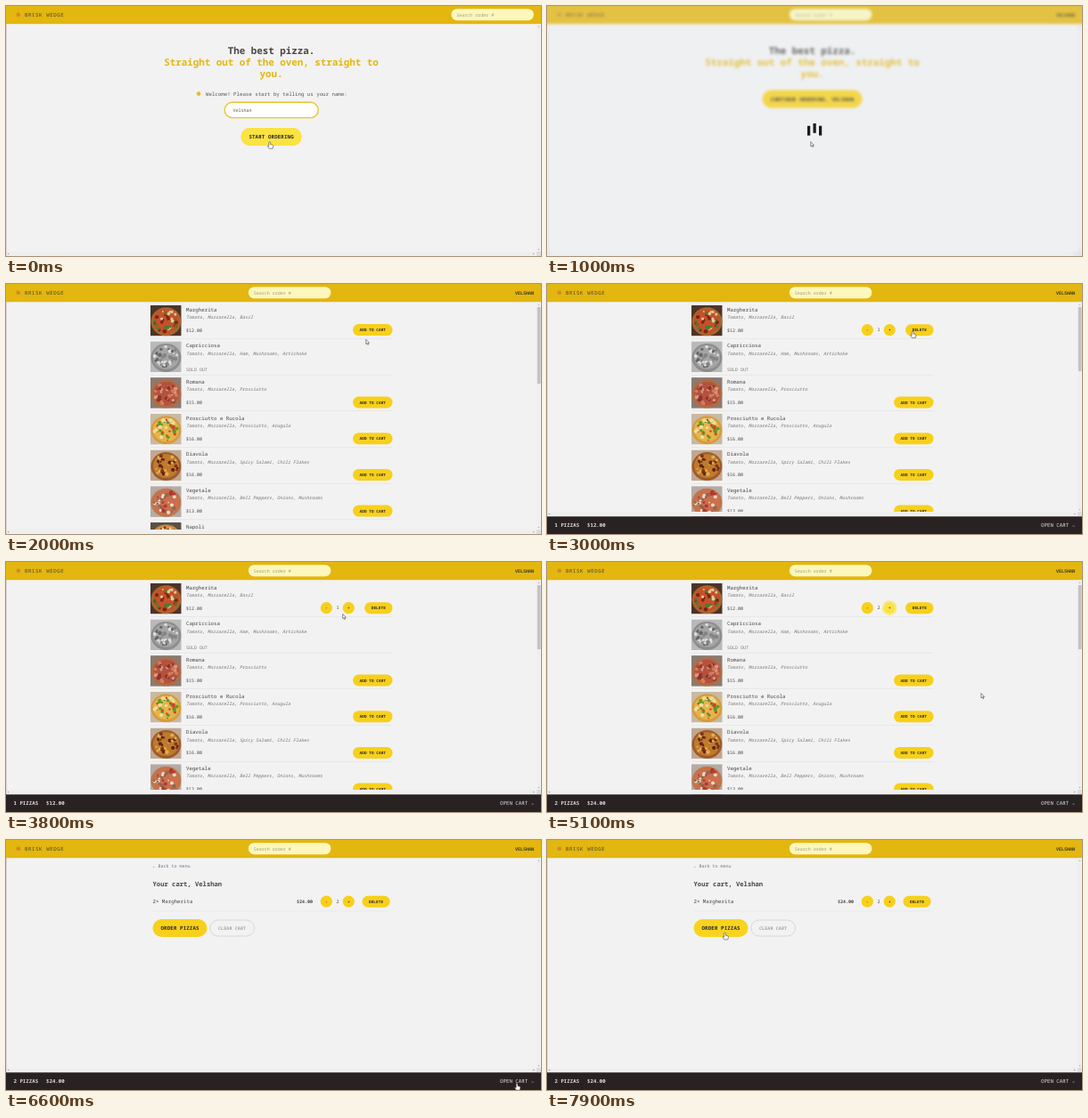
Animation of 600 by 281 pixels, one loop 8000 ms. Source, as an HTML page:

```html
<!DOCTYPE html>
<html lang="en">
<head>
<meta charset="utf-8">
<title>Pizza ordering</title>
<style>
html, body { margin: 0; width: 100%; height: 100%; overflow: hidden; background: #f2f2f2; }
svg { display: block; width: 600px; height: 281px; }
text {
  font-family: "Noto Sans Mono", "DejaVu Sans Mono", monospace;
  text-rendering: geometricPrecision;
  white-space: pre;
}
</style>
</head>
<body>
<svg id="stage" viewBox="0 0 600 281"></svg>
<script>
const LOOP = 8000;
const LOAD = 700, MENU = 1700, ADDED = 3000, DOUBLED = 4300, CART = 6500;
const BASE = 5.76, SMALL = 5, TINY = 4.29;
const GOLD = '#e3b610', YELLOW = '#f7d01b', BRIGHT = '#fae343', DARK = '#2b2725', TEXT = '#494542';
const USER = 'Velshan';

const text = (x, y, str, size, fill = TEXT, attrs = '') =>
  `<text x="${x}" y="${y}" font-size="${size}" fill="${fill}" ${attrs}>${str}</text>`;
const rect = (x, y, w, h, fill, attrs = '') =>
  `<rect x="${x}" y="${y}" width="${w}" height="${h}" fill="${fill}" ${attrs}/>`;
const circle = (x, y, r, fill, attrs = '') =>
  `<circle cx="${x}" cy="${y}" r="${r}" fill="${fill}" ${attrs}/>`;
const group = (id, body, attrs = '') => `<g id="${id}" ${attrs}>${body}</g>`;
const pill = (x, y, w, h, fill, attrs = '') => rect(x, y, w, h, fill, `rx="${h / 2}" ${attrs}`);
const MIDDLE = 'text-anchor="middle"', BOLD = 'font-weight="600"', MEDIUM = 'font-weight="500"';

// A pill button; a given id adds a brighter layer for hovering.
function button(x, y, w, h, label, size, id) {
  const glow = id ? pill(x, y, w, h, BRIGHT, `id="${id}" opacity="0"`) : '';
  return pill(x, y, w, h, YELLOW) + glow +
    text(x + w / 2 + size * .0125, y + h / 2 + size * .36, label, size, DARK,
      `${MIDDLE} ${BOLD} letter-spacing="${size * .025}"`);
}

function stepper(y, deleteX, deleteW, countId, plusExtra = '') {
  return button(352.7, y - 6.6, 13.2, 13.2, '-', TINY) +
    text(371.9, y + 1.7, '2', SMALL, TEXT, `${MIDDLE} ${MEDIUM} ${countId}`) +
    circle(384.2, y, 6.6, YELLOW) + plusExtra +
    text(384.2, y + 1.6, '+', TINY, DARK, `${MIDDLE} ${BOLD}`) +
    button(deleteX, y - 6.5, deleteW, 13, 'DELETE', TINY);
}

const pizzas = [
  ['Margherita', 'Tomato, Mozzarella, Basil', 12, '#4d3428', '#a9642f', '#c4512a', ['#e9c795', '#4e7a2c', '#7d2417']],
  ['Capricciosa', 'Tomato, Mozzarella, Ham, Mushrooms, Artichoke', 0, '#b9b9b9', '#8d8d8d', '#a4a4a4', ['#dedede', '#666666', '#848484']],
  ['Romana', 'Tomato, Mozzarella, Prosciutto', 15, '#8c7a70', '#b06c43', '#b4523f', ['#d99a85', '#8d3428', '#cf7d5a']],
  ['Prosciutto e Rucola', 'Tomato, Mozzarella, Prosciutto, Arugula', 16, '#c9b9a2', '#d69c3c', '#e4b54a', ['#5d9a2b', '#cf4429', '#f0dc9a']],
  ['Diavola', 'Tomato, Mozzarella, Spicy Salami, Chili Flakes', 16, '#c1a78f', '#9c5b2d', '#c07a2c', ['#5f2417', '#e1b04a', '#84331b']],
  ['Vegetale', 'Tomato, Mozzarella, Bell Peppers, Onions, Mushrooms', 13, '#b5aaa4', '#bd774a', '#cb6f4d', ['#efd9c6', '#b0392c', '#8d6a50']],
  ['Napoli', '', 16, '#5d5043', '#c98b45', '#d39b48', ['#efd9a4', '#a64a25', '#6b3a20']]
];

const random = n => { const v = Math.sin(n * 12.9898) * 43758.5453; return v - Math.floor(v); };

function photo(seed, y, [bg, crust, sauce, toppings]) {
  let out = rect(0, 0, 34.7, 34.7, bg) +
    `<ellipse cx="17.5" cy="18.5" rx="17" ry="16" fill="${crust}"/>` +
    `<ellipse cx="17.5" cy="18" rx="14.5" ry="13.3" fill="${sauce}"/>`;
  for (let i = 0; i < 36; i++) {
    const n = seed * 100 + i * 3 + 1;
    const angle = random(n) * 6.283, far = Math.sqrt(random(n + 1));
    out += circle((17.5 + 13.5 * far * Math.cos(angle)).toFixed(1), (18 + 12.4 * far * Math.sin(angle)).toFixed(1),
      (.9 + random(n + 2) * 1.4).toFixed(1), toppings[i % 3]);
  }
  return `<svg x="162" y="${y}" width="34.7" height="34.7">${out}</svg>`;
}

function menuRow([name, parts, price, ...look], i) {
  const y = 23.7 + i * 40.7;
  let out = photo(i + 1, y, look) +
    text(202, y + 6.9, name, BASE, TEXT, MEDIUM) +
    text(202, y + 15.1, parts, SMALL, '#78736f', 'font-style="italic"') +
    (price ? text(202, y + 29.8, `$${price}.00`, SMALL) : text(202, y + 33.6, 'SOLD OUT', SMALL, '#7b7672', MEDIUM)) +
    rect(162, y + 37.5, 271.5, .4, '#d9d7d5');
  const add = button(389, y + 21.4, 44.5, 13, 'ADD TO CART', TINY, i ? '' : 'addHover');
  if (i === 0) {
    const ring = group('plusFocus', circle(384.2, y + 28, 8.3, '#f8e46a') + circle(384.2, y + 28, 7.4, '#f8eeb0')) +
      circle(384.2, y + 28, 6.6, BRIGHT, 'id="plusHover"');
    out += group('add', add) + group('step', stepper(y + 28, 402, 31.5, 'id="count"', ring));
  } else if (price) out += add;
  return out;
}

const title = (y, str, fill) => text(297.5, y, str, 10.85, fill, `${MIDDLE} ${BOLD}`);

const header = rect(-20, -20, 640, 40.2, GOLD) +
  circle(13.8, 9.8, 2.3, '#d08a2c') +
  text(21, 11.9, 'BRISK WEDGE', BASE, '#4c4526', 'letter-spacing=".576"') +
  group('search', pill(0, 3.2, 92.6, 13, '#fdf7bd') + text(6, 11.6, 'Search order #', SMALL, '#9c9884')) +
  text(592, 11.5, USER.toUpperCase(), SMALL, '#3f3a20', `id="user" text-anchor="end" ${BOLD}`);

const home = title(54.1, 'The best pizza.', TEXT) +
  title(67.2, 'Straight out of the oven, straight to', GOLD) +
  title(80.2, 'you.', GOLD) +
  group('form',
    '<path d="M213.5 98.5l1-2 .8.6.6-1.4.8.2.2 1 .9-.5.4 3.2-1.6 1.6-2.1-.6z" fill="#f0b92e"/>' +
    text(224, 100.6, 'Welcome! Please start by telling us your name:', BASE, '#5b5753') +
    pill(245.2, 108.2, 105, 17.4, '#fff', `stroke="#e9c62c" stroke-width="1.4"`) +
    text(254.5, 118.9, USER, SMALL, '#57534e') +
    button(263.5, 137, 68, 20, 'START ORDERING', BASE, 'startHover')) +
  group('resume', button(241.5, 94.5, 112, 20, `CONTINUE ORDERING, ${USER.toUpperCase()}`, BASE));

const cart = text(164.5, 31.3, '← Back to menu', SMALL, '#667789') +
  text(164.5, 51.5, `Your cart, ${USER}`, 7.2, TEXT, BOLD) +
  text(164.5, 71.2, '2× Margherita', BASE) +
  text(326, 71, '$24.00', SMALL, TEXT, 'font-weight="700"') +
  stepper(69.2, 399.5, 31, '') +
  rect(164.5, 79.8, 266, .4, '#dddbd9') +
  button(164.5, 89, 61, 20, 'ORDER PIZZAS', BASE, 'orderHover') +
  pill(228.7, 90, 49.8, 18, 'none', 'stroke="#d3d0cd" stroke-width=".8"') +
  text(253.6, 100.9, 'CLEAR CART', SMALL, '#a6a19d', `${MIDDLE} ${BOLD} letter-spacing=".125"`);

const arrow = (x, y, turn) =>
  `<path d="M-.8 .6L0-.6.8 .6z" fill="#777" transform="translate(${x} ${y}) rotate(${turn})"/>`;
const scrollbars = rect(595, 20.2, 5, 261, '#efefef') + arrow(597.5, 23, 0) +
  rect(595.8, 26, 3.8, 86, '#c3c3c3', 'id="thumb"') +
  group('lower', rect(0, 276, 600, 5.2, '#efefef') + arrow(2.5, 278.6, -90) + arrow(592, 278.6, 90) +
    arrow(597.5, 273.5, 180) + rect(595, 276, 5, 5, '#dedede'));

const bar = rect(0, 261.3, 600, 20, '#282223') +
  text(8.5, 273.4, '', BASE, '#dedad8', `id="total" ${BOLD}`) +
  text(592, 273.4, 'OPEN CART →', BASE, '#e7e5e4', `text-anchor="end" ${MEDIUM}`);

const pointer = 'fill="#fff" stroke="#333" stroke-width=".55" stroke-linejoin="round"';
document.getElementById('stage').innerHTML =
  group('page',
    rect(-20, -20, 640, 321, '#f2f2f2') +
    group('home', home) + group('menu', pizzas.map(menuRow).join('')) + group('cart', cart) +
    header + scrollbars + rect(0, 20, .6, 261, '#d9b9be')) +
  group('bar', bar) +
  group('loader', rect(0, 0, 600, 281, '#e2e8f0', 'opacity=".22"') +
    [0, 1, 2].map(i => rect(292 + i * 6.5, 0, 3.2, 10.8, '#1c1917', `id="beat${i}"`)).join('')) +
  group('cursor',
    `<path id="hand" d="M-.9 1Q-.9 0 0 0T.9 1V3L3.1 3.5Q4 3.8 3.9 5L3.3 7.6H-.7L-2.6 4.9Q-2.2 3.9-.9 4.9Z" ${pointer}/>` +
    `<path id="arrow" d="M0 0V5.2L1.2 4.2 2 6 2.9 5.6 2.1 3.9H3.7Z" ${pointer}/>`);

const el = Object.fromEntries([...document.querySelectorAll('[id]')].map(e => [e.id, e]));
const show = (id, on) => { el[id].style.display = on ? '' : 'none'; };
const fade = (id, t, start) => el[id].setAttribute('opacity', Math.min(1, Math.max(0, (t - start) / 300)));

// Linear interpolation over rows of [time, ...values].
function track(keys, t) {
  const i = keys.findIndex(k => k[0] > t);
  const a = keys[i - 1], b = keys[i], p = (t - a[0]) / (b[0] - a[0]);
  return a.slice(1).map((v, j) => v + (b[j + 1] - v) * p);
}

const path = [
  [0, 295.8, 152.6], [1750, 295.8, 152.6], [2000, 403.7, 62.3], [2350, 410, 53], [3350, 410, 53],
  [3800, 377.6, 58.5], [4000, 384, 52], [4750, 384, 52], [5100, 486.7, 147.3], [5500, 573, 266],
  [5800, 573, 273.5], [6700, 573, 273.5], [7200, 405, 195], [7700, 199.5, 104.3], [8001, 199.5, 104.3]
];
const overLinks = [[0, LOAD], [2250, 3450], [3900, 4800], [5480, 6720], [7600, LOOP]];
// Bar heights, from 0 at the top to 1 at the bottom.
const beats = [
  [0, .5, .5, .5], [.2, 0, .5, .5], [.4, 1, 0, .5], [.6, .5, 1, 0], [.8, .5, .5, 1], [1, .5, .5, .5]
];

function draw(now) {
  const t = now % LOOP;
  const loading = t >= LOAD && t < MENU, onMenu = t >= MENU && t < CART;
  const hasItems = t >= ADDED, count = t < DOUBLED ? 1 : 2;

  show('home', t < MENU);
  show('form', t < LOAD);
  show('resume', t >= LOAD);
  show('menu', onMenu);
  show('cart', t >= CART);
  show('bar', hasItems);
  show('add', !hasItems);
  show('step', hasItems);
  show('user', t >= LOAD);
  show('thumb', onMenu);
  show('plusFocus', t >= DOUBLED);
  show('loader', loading);

  el.search.setAttribute('transform', `translate(${t < LOAD ? 499.3 : 271.8} 0)`);
  el.page.style.filter = loading ? 'blur(1.4px)' : 'none';
  el.thumb.setAttribute('height', hasItems ? 72 : 86);
  el.lower.setAttribute('transform', `translate(0 ${hasItems ? -20 : 0})`);
  el.count.textContent = count;
  el.total.innerHTML = `${count} PIZZAS<tspan x="45">$${count * 12}.00</tspan>`;

  fade('startHover', t, -300);
  fade('addHover', t, 2250);
  fade('plusHover', t, 3950);
  fade('orderHover', t, 7850);

  if (loading) track(beats, (t - LOAD) / 1000 % 1).forEach((v, i) =>
    el['beat' + i].setAttribute('y', 129.3 + v * 10.8));

  el.cursor.setAttribute('transform', `translate(${track(path, t).join(' ')})`);
  const linked = overLinks.some(([from, to]) => t >= from && t < to);
  show('hand', linked);
  show('arrow', !linked);
}

const start = performance.now();
function tick() {
  draw(performance.now() - start);
  requestAnimationFrame(tick);
}
tick();
</script>
</body>
</html>
```
